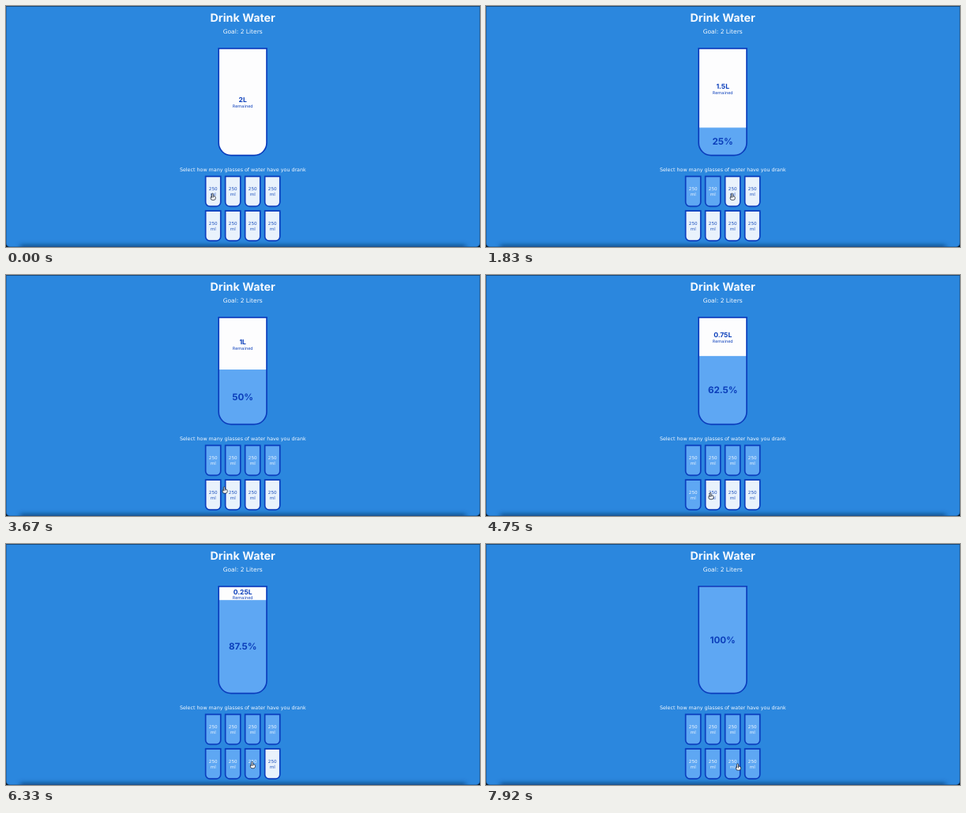
Animation of 600 by 306 pixels, one loop 8 s. Source, as an HTML page:

```html
<!DOCTYPE html>
<html lang="en">
<head>
<meta charset="utf-8">
<title>Drink Water</title>
<style>
  html, body { margin: 0; width: 100%; height: 100%; overflow: hidden; background: #0b1a2a; }
  svg { display: block; width: 600px; height: 306px; --water: #5ea7f3; }
  text { font-family: "DejaVu Sans", sans-serif; text-anchor: middle; text-rendering: geometricPrecision; }
  .light { fill: #f4f9fe; }
  .blue { fill: #0c3fbb; }
  .bold { font-family: Inter, sans-serif; font-weight: 700; }
  .edge { fill: none; stroke: #0b3dbd; stroke-width: 1.67px; }
</style>
</head>
<body>
<svg viewBox="0 0 600 306">
  <defs>
    <clipPath id="inside"><path id="clipShape"/></clipPath>
    <clipPath id="page"><rect y="-9" width="600" height="315" rx="5"/></clipPath>
    <filter id="blur" y="-2" height="5"><feGaussianBlur stdDeviation="3"/></filter>
  </defs>
  <g clip-path="url(#page)">
    <rect width="600" height="306" fill="#2b87de"/>
    <rect x="18" y="304" width="564" height="6" fill="#0d3f75" filter="url(#blur)"/>
    <rect y="-9" width="600" height="315" rx="5" fill="none" stroke="#17497c"/>
    <rect width="600" height="1" fill="#17497c"/>
  </g>

  <text class="light bold" x="299.7" y="19.8" font-size="14.3">Drink Water</text>
  <text class="light" x="299.7" y="34.7" font-size="7.5">Goal: 2 Liters</text>
  <text class="light" x="299.8" y="209.5" font-size="6.35">Select how many glasses of water have you drank</text>

  <g clip-path="url(#inside)">
    <rect x="268" y="53" width="63" height="138" fill="#fdfdfe"/>
    <rect id="water" x="268" width="63" height="138" fill="var(--water)"/>
    <g id="remained" class="blue">
      <text id="liters" class="bold" x="299.7" y=".6" font-size="8.5"></text>
      <text x="299.7" y="7.4" font-size="5.15">Remained</text>
    </g>
    <text id="percent" class="blue bold" x="299.7" font-size="11.6"></text>
  </g>
  <path id="bigEdge" class="edge"/>
  <g id="cups"></g>
  <g id="hand" fill="#fff" stroke="#111c30" stroke-width=".8">
    <rect x="-3" y="-.8" width="6" height="5" rx="2"/>
    <path d="M-1.8 1.5V-3.2a.9 .9 0 0 1 1.8 0V1.5"/>
  </g>
</svg>
<script>
const LOOP = 8000, FADE = 300, SCALE = 600 / 1440;
const TOP = 54.7, BOTTOM = 188.8, MIN_REMAINED = 16.5;
const clicks = [350, 1200, 2050, 2850, 4200, 5120, 6050, 7150];
const $ = id => document.getElementById(id);
const clamp = v => Math.min(1, Math.max(0, v));
const lerp = (a, b, p) => a + (b - a) * p;

// CSS "ease": cubic-bezier(.25, .1, .25, 1)
function ease(x) {
  const curve = (a, b, u) => 3 * a * u * (1 - u) ** 2 + 3 * b * u * u * (1 - u) + u ** 3;
  let lo = 0, hi = 1;
  for (let i = 0; i < 20; i++) {
    const mid = (lo + hi) / 2;
    if (curve(.25, .25, mid) < x) lo = mid; else hi = mid;
  }
  return curve(.1, 1, lo);
}

const glass = (x, y, w, h, r) =>
  `M${x} ${y}h${w}v${h - r}a${r} ${r} 0 0 1 ${-r} ${r}h${2 * r - w}a${r} ${r} 0 0 1 ${-r} ${-r}Z`;

const bigShape = glass(269.2, 53.9, 60.8, 135.7, 15.8);
$('clipShape').setAttribute('d', bigShape);
$('bigEdge').setAttribute('d', bigShape);

const spots = clicks.map((_, i) => ({ x: 262.2 + i % 4 * 25, y: 215.6 + (i >> 2) * 43.75 }));
$('cups').innerHTML = spots.map(({ x, y }) =>
  `<g><path class="edge" d="${glass(x - 9.55, y + .8, 19.1, 37.9, 5.4)}"/>
    <text x="${x}" y="${y + 18.5}" font-size="5.6">250</text>
    <text x="${x}" y="${y + 25.7}" font-size="5.6">ml</text></g>`).join('');
const cups = [...$('cups').children];

// The pointer visits each glass, then drifts back towards the one before the last.
const rests = spots.map(({ x, y }, i) => ({ x, y: y + (i < 4 ? 26.5 : 21.2) }));
rests.push({ x: 319.5, y: 283 });

function pointerAt(t, count) {
  const from = rests[Math.max(0, count - 1)], to = rests[count];
  const start = (count ? clicks[count - 1] : 0) + 250;
  const end = (clicks[count] ?? LOOP) - 300;
  const u = count ? clamp((t - start) / (end - start)) : 0;
  const p = u * u * (3 - 2 * u);
  return [lerp(from.x, to.x, p), lerp(from.y, to.y, p)];
}

function draw(t) {
  const progress = clicks.map(c => ease(clamp((t - c) / FADE)));
  const count = clicks.filter(c => t >= c).length;
  const full = count === clicks.length;

  const level = progress.reduce((a, b) => a + b) / clicks.length;
  const highest = full ? TOP : TOP + MIN_REMAINED;
  const surface = Math.max(highest, BOTTOM - 330 * SCALE * level);
  $('water').setAttribute('y', surface);

  $('remained').setAttribute('transform', `translate(0 ${(TOP + surface) / 2})`);
  $('remained').style.visibility = full ? 'hidden' : 'visible';
  $('water').style.visibility = count ? 'visible' : 'hidden';
  $('liters').textContent = 2 - count * .25 + 'L';
  $('percent').textContent = count ? count * 12.5 + '%' : '';
  $('percent').setAttribute('y', (surface + BOTTOM) / 2 + 4.3);

  cups.forEach((cup, i) => {
    const p = progress[i] * 100;
    cup.firstChild.style.fill = `color-mix(in srgb, var(--water) ${p}%, #e9f2fc)`;
    cup.style.fill = `color-mix(in srgb, #f0f7fe ${p}%, #1c50bd)`;
  });

  $('hand').setAttribute('transform', `translate(${pointerAt(t, count)})`);
}

function frame() {
  draw(performance.now() % LOOP);
  requestAnimationFrame(frame);
}
frame();
</script>
</body>
</html>
```
